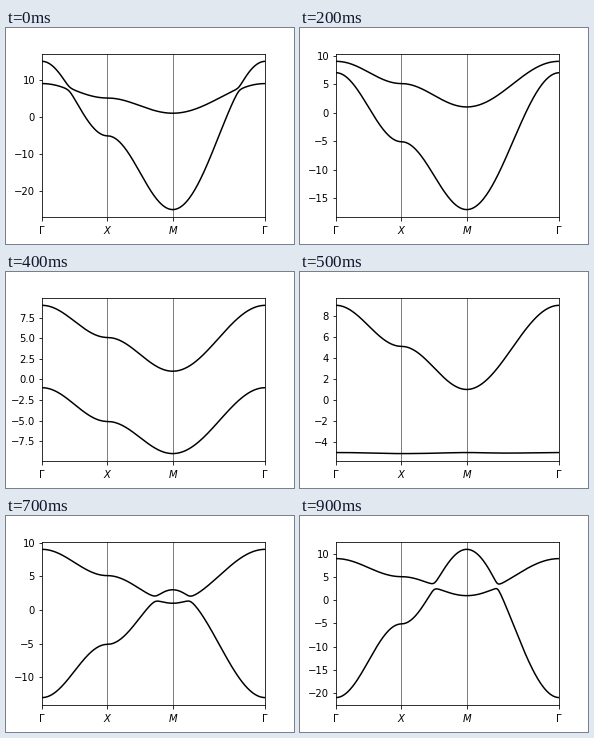
These frames come from a looping animation (288 by 216 pixels, 1 s). A matplotlib script:

```python
import numpy as np
import matplotlib.pyplot as plt
from matplotlib.animation import FuncAnimation

FRAMES = 10
POINTS = 101
CORNERS = np.pi * np.array([[0, 0], [1, 0], [1, 1], [0, 0]])
LABELS = [r"$\Gamma$", "$X$", "$M$", r"$\Gamma$"]

plt.rcParams.update({"font.family": "DejaVu Sans", "font.size": 10})


def k_path(corners):
    """Straight segments between the corners, with distance along the path."""
    lengths = np.linalg.norm(np.diff(corners, axis=0), axis=1)
    nodes = np.concatenate([[0], np.cumsum(lengths)])
    dist = np.unique(np.concatenate(
        [np.linspace(a, b, POINTS) for a, b in zip(nodes, nodes[1:])]))
    kx, ky = (np.interp(dist, nodes, corners[:, i]) for i in range(2))
    return nodes, dist, kx, ky


def bands(kx, ky, hopping):
    """Energies of two orbitals on a square lattice with weak mixing."""
    cx, cy = np.cos(kx), np.cos(ky)
    first = 5 + 2 * (cx + cy)
    second = -5 + 2 * hopping * (cx + cy)
    mixing_sq = (1 - cx * cy) / 2
    mean = (first + second) / 2
    split = np.sqrt(((first - second) / 2) ** 2 + mixing_sq)
    return mean - split, mean + split


nodes, dist, kx, ky = k_path(CORNERS)

fig, ax = plt.subplots(figsize=(4, 3), dpi=72)
fig.subplots_adjust(left=0.125, right=0.9, bottom=0.125, top=0.88)
ax.set_xlim(nodes[0], nodes[-1])
ax.set_xticks(nodes, LABELS)
for node in nodes[1:-1]:
    ax.axvline(node, color="black", lw=0.5)
lines = [ax.plot([], [], color="black", lw=1.5)[0] for _ in range(2)]


def draw(frame):
    energies = bands(kx, ky, 5 - frame)
    for line, energy in zip(lines, energies):
        line.set_data(dist, energy)
    low, high = np.min(energies), np.max(energies)
    pad = 0.05 * (high - low)
    ax.set_ylim(low - pad, high + pad)
    return lines


anim = FuncAnimation(fig, draw, frames=FRAMES, interval=100,
                     repeat=True, repeat_delay=0, blit=False)
plt.show()
```
